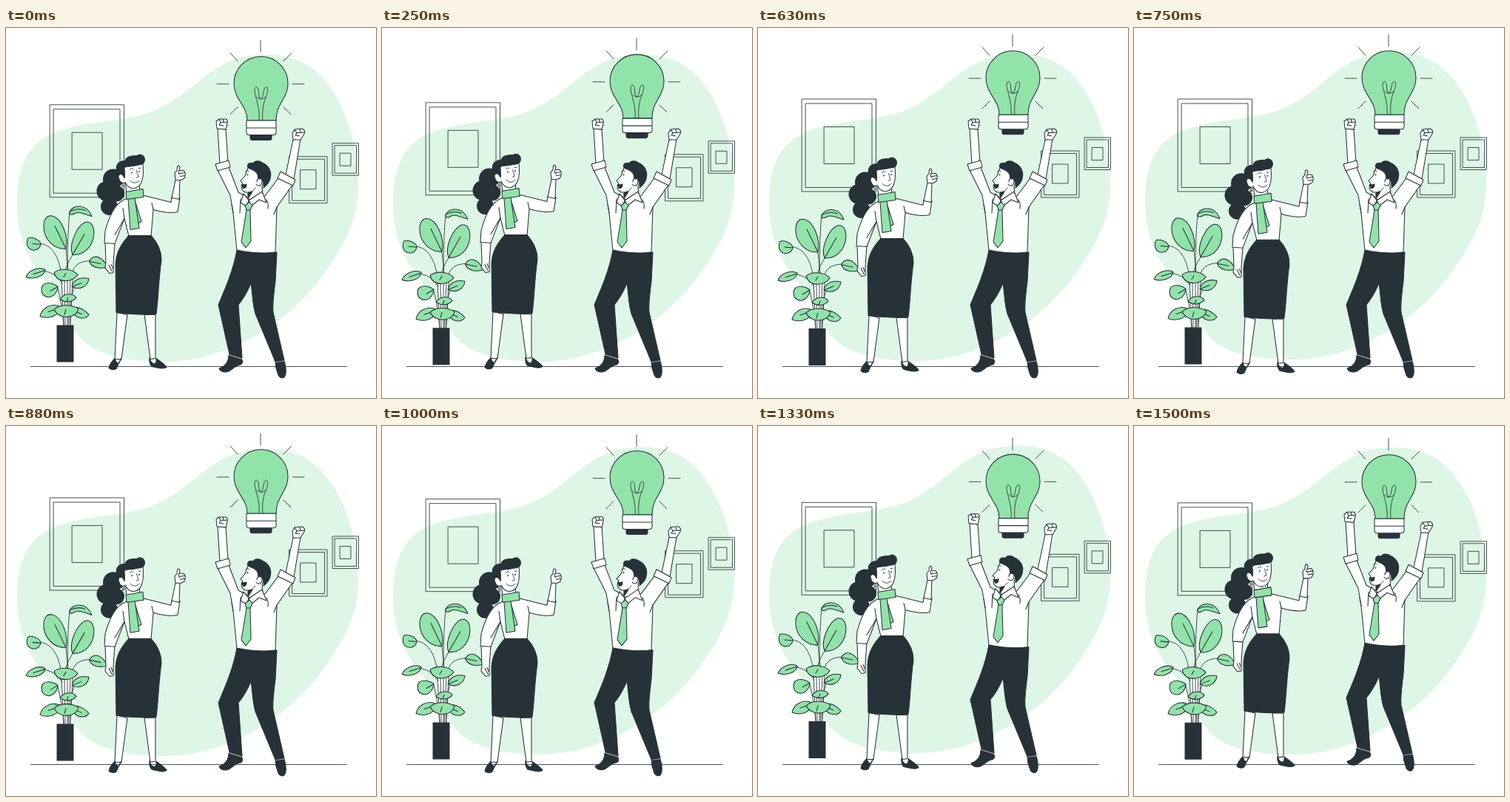
Write an HTML page that moves like this. It is 500 by 500 pixels and loops after 1540 ms.

```html
<!DOCTYPE html>
<html lang="en">
<head>
<meta charset="utf-8">
<title>Bright idea</title>
<style>
  html, body { margin: 0; width: 100%; height: 100%; overflow: hidden; background: #fff; }
  svg { display: block; width: 100%; height: 100%; }
  .ink { stroke: #263238; stroke-width: 1.05; stroke-linecap: round; stroke-linejoin: round; fill: none; }
  .thin { stroke-width: .85; }
  .w { fill: #fff; }
  .g { fill: #92e3a9; }
  .d { fill: #263238; }
</style>
</head>
<body>
<svg viewBox="0 0 500 500">
  <path id="blob" fill="#def6e5" d="M15 237C15 191 27 159 62 143C99 126 160 127 195 114C235 99 255 72 290 51C325 31 375 30 407 50C443 71 476 136 476 215C476 266 449 306 423 341C382 396 300 451 215 451C165 451 120 442 99 417C80 392 70 362 50 338C28 310 15 280 15 237Z"/>

  <g id="wall" class="ink">
    <g class="thin">
      <path d="M59.500 104H159.500V229H59.500ZM64.500 110H154V223.500H64.500ZM89.500 141.500H130V191.500H89.500Z"/>
      <path d="M383 174H434V237H383ZM387 177.500H430.500V233.500H387ZM398 192H419V218H398Z"/>
      <path d="M441.500 156H476.500V199.500H441.500ZM444.500 159H473.500V196.500H444.500ZM451.500 169.500H466V186.500H451.500Z"/>
    </g>
    <path class="thin" d="M344 17V33M285 76H301M387 76H403M303 34L313 45M386 34L375 45M303 117L313 107M385 117L375 107"/>
    <g transform="translate(0 -.7)">
      <path class="g" d="M326 126C326 113 320 107 315 98C310 90 308 84 308 76A36.500 36.500 0 0 1 381 76C381 84 379 90 374 98C369 107 365 113 365 126Z"/>
      <path class="thin" d="M342 126C343 114 340 103 337 92C335 85 336 80 339 81C343 84 340 93 344 97C349 94 347 83 351 81C355 80 354 88 351 95C347 104 346 116 347 126M339 94C342 98 348 98 351 94"/>
      <path class="w" d="M325 126H365V142Q365 145.500 361.500 145.500H328.500Q325 145.500 325 142ZM325 136H365"/>
      <path class="d" d="M330 146H359V150Q359 152.500 356 152.500H333Q330 152.500 330 150Z"/>
    </g>
  </g>

  <path class="ink thin" d="M33.500 457.500H460.500"/>

  <g id="plant" class="ink">
    <path class="w" stroke="none" d="M76 340H89L87 402H77Z"/>
    <path class="thin" d="M75 340L78 402M79 340L80 402M83 340V402M87 340L84 402M90 340L87 402M93 346Q86 370 86 402M70 352Q76 375 78 402"/>
    <path class="thin" d="M84 328L81 299M80 328Q84 316 90 307M83 328Q83 280 86 248M47 292C62 294 70 308 74 328M53 329Q70 333 76 346M113 315C99 316 92 321 89 332"/>
    <path class="g" d="M81 299C66 300 52 287 51 271C50 259 56 252 64 255C75 259 85 281 81 299ZM66 268L81 299"/>
    <path class="g" d="M90 307C84 293 96 268 107 263C116 261 120 270 118.500 282C116 297 105 308 90 307ZM106 279L90 307"/>
    <path class="g" d="M86 250C89 239 109 237 116 255C106 252 98 248 93 251C90 253 86 254 86 250ZM87 248Q98 243 107 247"/>
    <path class="g" d="M47 293C45 301 36 303 31 298C27 294 28 285 31 284C38 283 47 288 47 293ZM36 292L47 293"/>
    <path class="g" d="M27 337C30 329 43 322 53 327C52 336 38 341 27 337ZM37 333L53 328"/>
    <path class="g" d="M112.500 316C116 309 122 308 128 312C134 315 134 321 138 323C128 327 116 325 112.500 316ZM113 316L128 319"/>
    <path class="g" d="M89 350C91 342 99 336 112 339C111 349 100 356 89 350ZM90 350L102 345"/>
    <path class="g" d="M70 350C69 360 61 367 53 363C47 360 47 352 50 348C55 343 65 346 70 350ZM60 356L70 350"/>
    <path class="g" d="M65 331C73 325 89 325 97 334C91 344 69 347 65 331ZM81 332L78 337"/>
    <path class="g" d="M73 367C79 358 91 359 95 365C89 372 80 372 73 367ZM84 365L82 370"/>
    <path class="g" d="M46 390C48 380 60 371 73 377C73 389 59 395 46 390ZM57 384L72 379"/>
    <path class="g" d="M89 380C96 375 106 381 112 388C107 395 92 395 89 380ZM90 382L102 387"/>
    <path class="g" d="M65 381C73 373 89 374 98 380C94 394 72 395 65 381ZM81 381L79 388"/>
    <path class="d" stroke="none" d="M68.500 402H91.500V452H68.500Z"/>
  </g>

  <g id="woman" class="ink">
    <g class="d" stroke="none">
      <circle cx="145" cy="205" r="14"/>
      <circle cx="136" cy="221" r="13.500"/>
      <circle cx="149" cy="224" r="11"/>
      <circle cx="139.500" cy="242" r="11.500"/>
    </g>
    <path class="w" d="M150 385L147 448L156 448L164 388ZM187 388L195 448L202 447L202 388Z"/>
    <path class="d" d="M147 447Q140 454 139 460Q143 464 149 461L153 452Q154 449 156 447L153 453Q149 455 147 447ZM194 446Q193 454 197 458L204 459.500Q213 462 217 459Q216 456 203 447Q204 455 199 454Q195 452 194 446Z"/>
    <path class="w" d="M134 290L135 318L134 325L140 332L145 331L145 319L147 290ZM139 321L143 329M142 320L144 325"/>
    <path class="w" d="M163 231C147 236 139 256 134 275L133 291L147 292L160 258L166 282H196L199 246C211 250 225 251 232 249L235 230L224 229L223 236L187 227Z"/>
    <path d="M160 258L158 244M147 280L160 258M199 246L197 237"/>
    <path class="w" d="M224 230L229 206L235 205L234 232Z"/>
    <path class="w" d="M229 206L228 197L231 193L231.500 188Q234 185 235 189L234 193L240 193Q243 196 242 201Q241 205 236 206ZM235 197L242 196M235 201L242 200M234 193Q232 198 235 198"/>
    <path class="d" d="M166 281H196C206 292 210 302 210 314C206 342 206 365 203 387C185 389 165 387 149 385L148 320C149 303 156 292 166 281Z"/>
    <path class="w" d="M161 206L163 224L181 222L180 210Z"/>
    <path class="w" d="M158 188C159 195 160 200 160 203C156 194 150 199 153 205C154 210 159 211 161 209C164 215 169 218 174 217C183 215 187 205 185 184L175 177Z"/>
    <path class="d" d="M150 195C147 185 153 180 161 180C162 173 174 173 177 173C183 169 189 175 187 181C185 187 179 185 177 186C171 188 164 187 160 189C160 194 161 198 160 203C158 197 154 196 151 200Z"/>
    <path class="thin" d="M168 207Q174 213 180 207M176.500 193L179 202L176 203M167 192Q169 189 172 191M179 190L182 190"/>
    <circle class="d" cx="170" cy="196" r="1" stroke="none"/>
    <circle class="d" cx="180" cy="194.500" r="1" stroke="none"/>
    <circle class="w thin" cx="156" cy="214" r="2"/>
    <path class="g" d="M173 230L183 262L177 265L168 231Z"/>
    <path class="g" d="M165 231L168 273L180 271L174 230Z"/>
    <path class="g" d="M162 222L185 218L186 229L163 232Z"/>
  </g>

  <g id="man" class="ink">
    <path class="w" d="M286 136L289 184L300 181L297 137ZM388 151L378 198L389 204L398 150Z"/>
    <path class="w" d="M285 136L284 126L288 123L297 123Q300 124 299 129L297 137ZM288 123L290 128L299 127M290 128L288 131L294 132M293 123L294 127"/>
    <path class="w" d="M388 151L387 142L390 137L400 136Q405 138 403 143L398 151ZM390 137L393 142L403 141M393 142L391 145L397 146M397 137L398 141"/>
    <path class="w" d="M286 192L303 226L307 250L312 301Q340 307 364 303L366 242L387 212L368 203L350 227L330 231L314 222L301 188Z"/>
    <path class="w" d="M283 184L301 179L303 188L286 193ZM371 194L391 205L388 213L367 203Z"/>
    <path d="M317 231L316 250M352 232Q355 237 354 244M366 242L362 252M307 250L305 238"/>
    <path class="w" d="M327 189C325 193 324 198 323 200L317 206.500L320 209.500C316 215 319 223 328 222L328 232L347 227L346 214L354 196L338 184Z"/>
    <path class="d" d="M327 189C325 184 329 181 334 183C336 179 343 179 346 182C354 185 359 193 357.500 201C357 208 353 212 348 216C349 209 347 205 344 206L341 204L340 198C339 193 333 192 327 189Z"/>
    <path class="w" d="M339 208C339 202 346 202 346 207C346 213 341 215 338 211"/>
    <path class="d" d="M318.500 211.500Q322 212 325 211Q325 217 320.500 216.500Z"/>
    <path class="thin" d="M324 194Q326 191 329 194M328 222Q334 221 337 216"/>
    <circle class="d" cx="326.500" cy="198.500" r="1" stroke="none"/>
    <path class="d" d="M327 223L333 221Q330 227 327 229Z"/>
    <path class="w" d="M321 224L317 236L325 241L328 233ZM346 221L352 236L342 232L331 241L328 233Z"/>
    <path class="g" d="M323 240L329 235L333 240L330 246L331 288L324 297L318 289L325 246Z"/>
    <path d="M325 246L330 246"/>
    <path class="d" d="M312 300Q340 306 366 303L364 342C362 358 360 372 361 384L376 449L364 451L337 386C333 372 333 357 331 345Q324 362 314 374L319 446L302 441L287 374C296 353 307 328 312 300Z"/>
    <path class="d" d="M301 442L318 447Q322 452 317 455C308 456 304 465 297 465Q290 465 288 460C295 458 301 452 301 442ZM364 451L376 450Q379 460 378 467Q377 473 373 473Q368 472 367 466Q364 459 364 451Z"/>
    <path stroke="#fff" stroke-width=".5" d="M302 442L318 447M365 451.500L376 450"/>
  </g>
</svg>
<script>
  const LOOP = 1540;
  const wave = t => Math.cos(2 * Math.PI * t / LOOP);
  // rises from rest once its delay has passed
  const lift = (t, delay, height) => t < delay ? 0 : -height / 2 * (1 - wave(t - delay));

  const moves = {
    blob: t => lift(t, 470, 9.2),
    wall: t => -4.1 + 4 * wave(t + 78),
    plant: t => .8 + 4 * wave(t - 470),
    woman: t => 2.4 - 4 * wave(t - 180),
    man: t => lift(t, 930, 8)
  };
  const parts = Object.entries(moves).map(([id, y]) => [document.getElementById(id), y]);

  function draw(t) {
    for (const [el, y] of parts) el.setAttribute("transform", `translate(0 ${y(t).toFixed(2)})`);
  }
  function tick() {
    draw(performance.now() % LOOP);
    requestAnimationFrame(tick);
  }
  tick();
</script>
</body>
</html>
```
